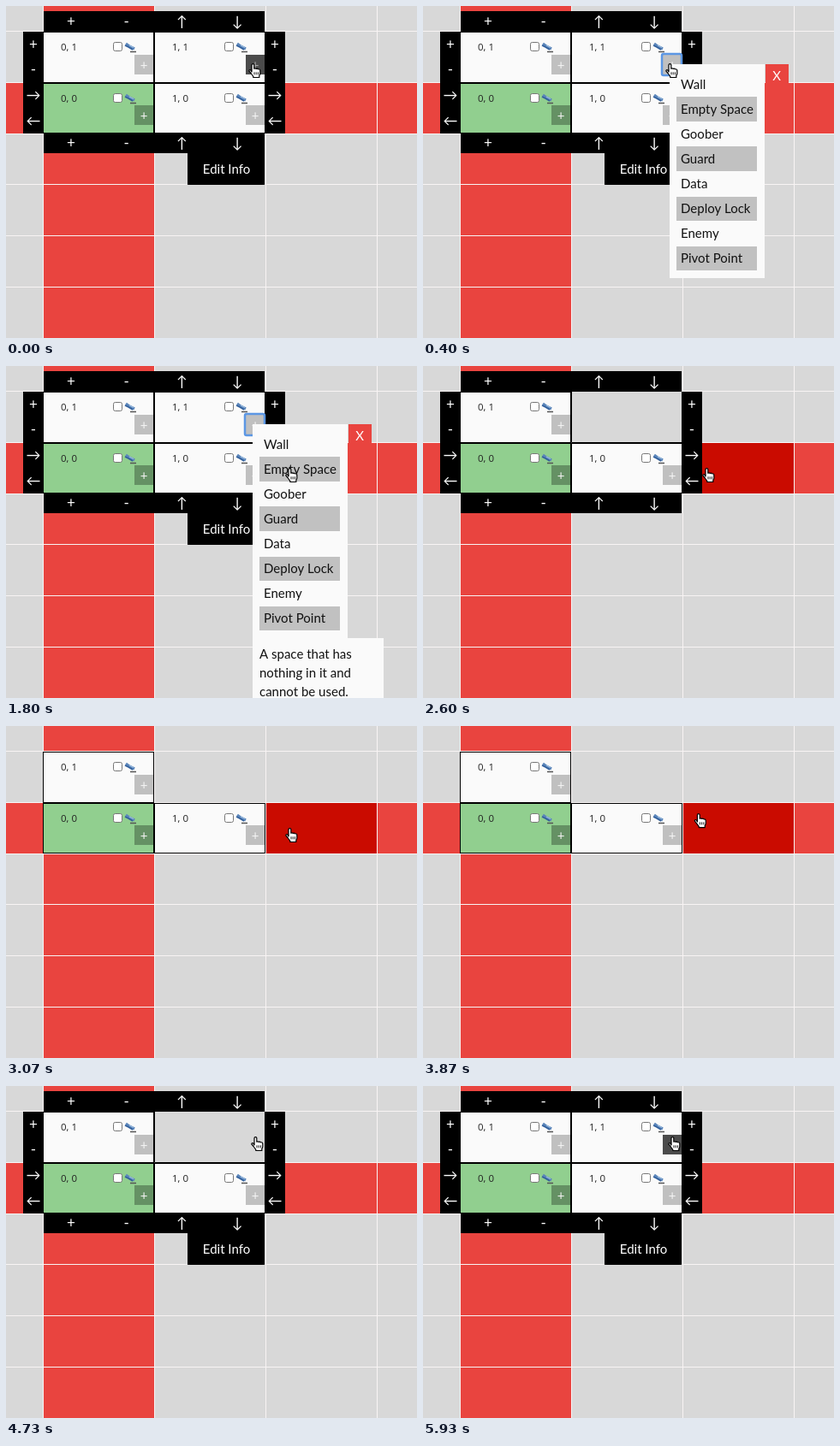
These frames come from a looping animation (480 px wide and 388 px high, 5.99 s). An HTML page with a canvas:

```html
<!DOCTYPE html>
<html lang="en">
<head>
<meta charset="utf-8">
<title>Grid editor</title>
<style>
  html, body { margin: 0; width: 100%; height: 100%; overflow: hidden; background: #d8d8d8; }
  canvas { display: block; }
</style>
</head>
<body>
<canvas id="stage" width="480" height="388"></canvas>
<script>
const ctx = document.getElementById('stage').getContext('2d');
const LOOP = 5990;
const UI_FONT = 'Lato, "DejaVu Sans", sans-serif';
const LABEL_FONT = '"Open Sans", sans-serif';
const RED = '#e9443f', PAPER = '#fafafa', GREEN = '#91cf8f';

const COLS = [-87, 43, 173, 303, 433, 563];
const ROWS = [-31, 29, 89, 149, 208, 268, 328, 388];
const MENU = ['Wall', 'Empty Space', 'Goober', 'Guard', 'Data', 'Deploy Lock', 'Enemy', 'Pivot Point'];
const WALL_INFO = ['A standard wall.'];
const EMPTY_INFO = ['A space that has', 'nothing in it and', 'cannot be used.'];

// Loop times of the user's actions.
const PRESS = 70, MENU_OPEN = 200, MENU_PICK = 2400, TOOLS_HIDE = 2700, CELL_ADD = 4930;

// Pointer tip: time, x, y
const POINTER_KEYS = [
  [0, 288, 68], [670, 288, 68], [1270, 313, 88], [1330, 313, 88], [1800, 331, 120],
  [3690, 331, 120], [4130, 305, 74], [4270, 299, 69], [4530, 292, 61],
  [4670, 292, 61], [4730, 291, 60], [LOOP, 291, 60]
];

const HAND = new Path2D('M4 10V2a1.4 1.4 0 0 1 2.8 0V6.2q1.2-.9 2.4.2q1.3-.7 2.4.4' +
  'q1.9-.3 2.2 1.4V11.5q0 1.5-1 2.8V16.5H5.8V15.3Q4.5 13.5 3 11.5L.8 8.8q.4-1.8 2-.8z');
const KNUCKLES = new Path2D('M7 10.3v3M9.2 10.3v3M11.4 10.3v3');

function box(color, x0, y0, x1, y1) {
  ctx.fillStyle = color;
  ctx.fillRect(x0, y0, x1 - x0, y1 - y0);
}

// Text is placed by the vertical centre of its capitals.
function text(str, x, midY, size, color, align = 'left', font = UI_FONT) {
  ctx.font = `${size}px ${font}`;
  ctx.textAlign = align;
  ctx.fillStyle = color;
  ctx.fillText(str, x, midY + size * 0.36);
}

function line(color, width, ...points) {
  ctx.strokeStyle = color;
  ctx.lineWidth = width;
  ctx.beginPath();
  points.forEach(([x, y]) => ctx.lineTo(x, y));
  ctx.stroke();
}

function pointerAt(t) {
  const i = POINTER_KEYS.findIndex(key => key[0] > t);
  const [t0, x0, y0] = POINTER_KEYS[i - 1];
  const [t1, x1, y1] = POINTER_KEYS[i];
  const p = (t - t0) / (t1 - t0);
  const k = t1 - t0 > 300 ? p * p * (3 - 2 * p) : p;
  return { x: x0 + (x1 - x0) * k, y: y0 + (y1 - y0) * k };
}

function drawGrid(hover) {
  box('#d8d8d8', 0, 0, 480, 388);
  box(RED, 43, 0, 173, 388);
  box(RED, 0, 90, 480, 149);
  if (hover) {
    const row = hover.y < 89 ? 1 : 2;
    box(row === 1 ? '#9d9d9d' : '#ca0b00', 303, ROWS[row], 433, ROWS[row + 1]);
  }
  COLS.forEach(x => box('#f8f4f4', x, 0, x + 1, 388));
  ROWS.forEach(y => box('#f8f4f4', 0, y, 480, y + 1));
}

function drawIcon(x, y) {
  line('#5b86bb', 3.2, [x + 1, y + 2], [x + 5, y + 5], [x + 11, y + 8]);
  line('#315f9c', 1.5, [x, y + 4], [x + 4, y + 6], [x + 9, y + 9]);
  line('#a9c8e8', 1, [x + 5, y + 4], [x + 10, y + 6.5]);
  line('#555', 1.5, [x + 6, y + 11.5], [x + 13, y + 11.5]);
}

function drawCell(col, row, active) {
  const x = 43 + col * 130;
  const y = row ? 30 : 90;
  const bottom = row ? 90 : 149;
  const green = !col && !row;
  box('#000', x, y, x + 130, bottom);
  box(green ? GREEN : PAPER, x + 1, y + 1, x + 129, bottom - 1);
  text(`${col}, ${row}`, x + 21, y + 17.5, 11.5, '#222', 'left', LABEL_FONT);

  ctx.beginPath();
  ctx.roundRect(x + 82.5, y + 12.5, 10, 10, 2);
  ctx.fillStyle = '#fff';
  ctx.fill();
  ctx.strokeStyle = '#777';
  ctx.lineWidth = 1;
  ctx.stroke();
  drawIcon(x + 96, y + 12);

  const shade = active ? '#4b4b4b' : `rgba(0,0,0,${green ? 0.3 : 0.23})`;
  box(shade, x + 107, bottom - 33, x + 129, bottom - 10);
  text('+', x + 118, bottom - 21.5, 15, active ? '#aaa' : '#f4f4f4', 'center');
}

function drawFocus() {
  ctx.beginPath();
  ctx.roundRect(279, 56, 23, 25, 2);
  ctx.strokeStyle = '#5c97e4';
  ctx.lineWidth = 2.5;
  ctx.stroke();
}

function drawTools(withInfo) {
  box('#000', 44, 6, 302, 30);
  box('#000', 44, 148, 302, 172);
  box('#000', 20, 30, 44, 149);
  box('#000', 302, 30, 326, 149);
  for (const y of [18, 160]) {
    ['+', '-', '↑', '↓'].forEach((s, i) => text(s, 76 + i * 64.7, y, 17, '#fff', 'center'));
  }
  for (const x of [32, 314]) {
    ['+', '-', '→', '←'].forEach((s, i) => text(s, x, 44.5 + i * 29.8, 17, '#fff', 'center'));
  }
  if (withInfo) {
    box('#000', 212, 172, 302, 209);
    text('Edit Info', 257.5, 191, 15, '#fff', 'center');
  }
}

function drawMenu(tip) {
  box(PAPER, 288, 68, 399, 318);
  box(RED, 400, 68, 427, 95);
  text('X', 413, 82, 15, '#fff', 'center');
  MENU.forEach((name, i) => {
    const y = 77 + i * 29.1;
    if (i % 2) box('#c1c1c1', 296, Math.round(y), 390, Math.round(y + 28.5));
    text(name, 301, y + 14.3, 15, '#111');
  });
  if (tip.x < 296 || tip.y < 77) return;
  const info = tip.y < 106 ? WALL_INFO : EMPTY_INFO;
  box(PAPER, 288, 318, 441, 334 + info.length * 22);
  info.forEach((row, i) => text(row, 296, 337 + i * 22, 15, '#111'));
}

function drawPointer(tip) {
  ctx.save();
  ctx.translate(tip.x - 5, tip.y - 1);
  ctx.fillStyle = '#fff';
  ctx.strokeStyle = '#000';
  ctx.lineJoin = 'round';
  ctx.lineWidth = 1.2;
  ctx.fill(HAND);
  ctx.stroke(HAND);
  ctx.lineWidth = 0.9;
  ctx.stroke(KNUCKLES);
  ctx.restore();
}

function draw(t) {
  const tip = pointerAt(t);
  const menuOpen = t >= MENU_OPEN && t < MENU_PICK;
  const outside = !menuOpen && tip.x > 303;
  const hasCell = t < MENU_PICK || t >= CELL_ADD;

  drawGrid(outside && tip);
  drawCell(0, 1);
  drawCell(0, 0);
  drawCell(1, 0);
  if (hasCell) drawCell(1, 1, !menuOpen);
  if (t < TOOLS_HIDE || !outside) {
    drawTools(!outside);
    if (!hasCell) {
      line('#000', 1, [173.5, 30], [173.5, 89.5], [302.5, 89.5]);
    }
  }
  if (t >= PRESS && t < MENU_PICK) drawFocus();
  if (menuOpen) drawMenu(tip);
  drawPointer(tip);
}

const start = performance.now();
function tick() {
  draw((performance.now() - start) % LOOP);
  requestAnimationFrame(tick);
}
tick();
</script>
</body>
</html>
```
